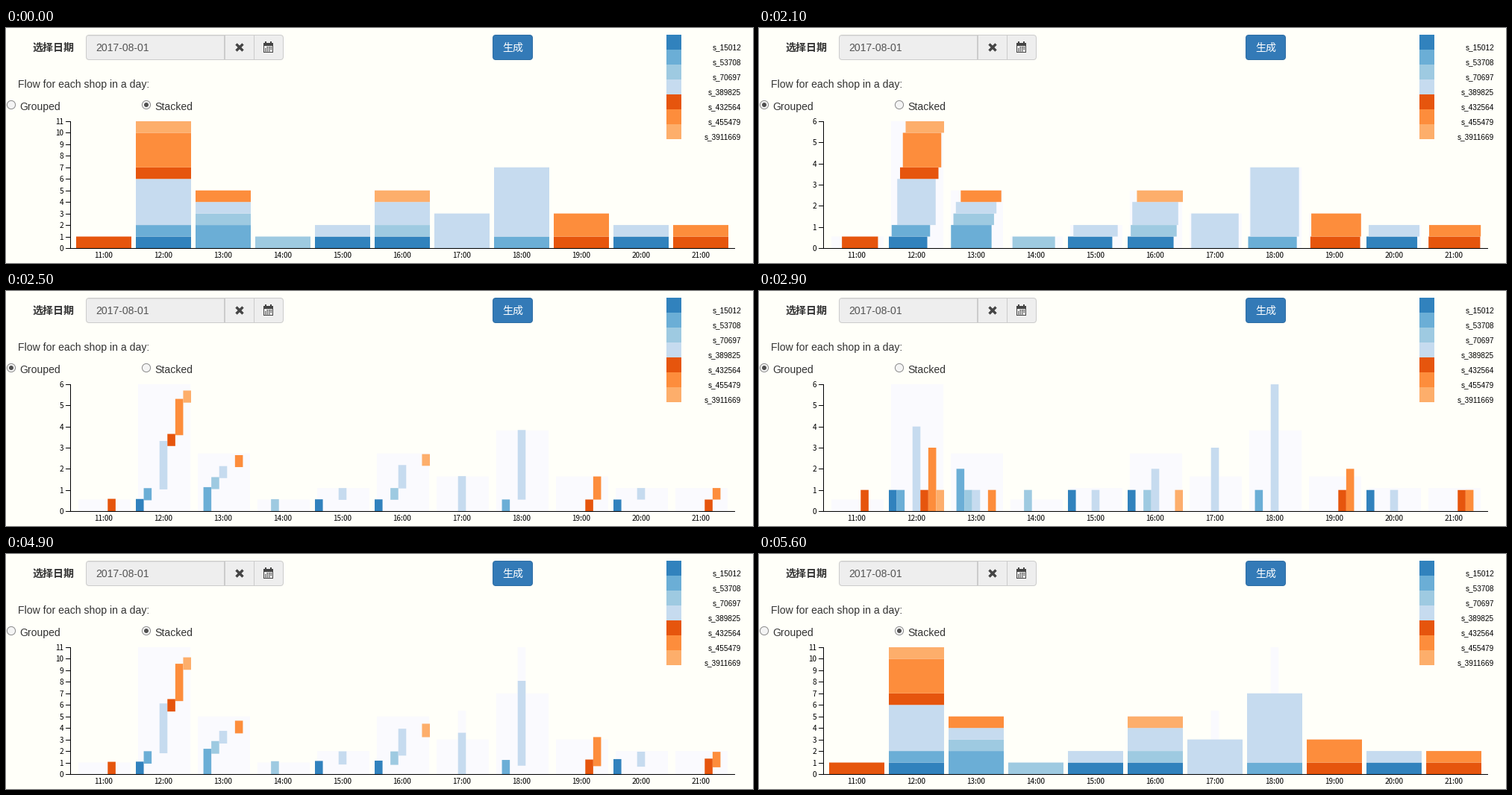
A matplotlib script for the animation above (7100 ms loop, 1001 px wide and 315 px high).

```python
import matplotlib.pyplot as plt
from matplotlib.animation import FuncAnimation
from matplotlib.patches import Circle, FancyBboxPatch, Rectangle

W, H, DPI = 1001, 315, 64
PT = 72 / DPI  # points per pixel
STEP_MS, LOOP_MS = 100, 7100

BACK = "#fffff9"
WASH = "#fafafe"
COLORS = ["#3182bd", "#6baed6", "#9ecae1", "#c6dbef",
          "#e6550d", "#fd8d3c", "#fdae6b"]
SHOPS = ["s_15012", "s_53708", "s_70697", "s_389825",
         "s_432564", "s_455479", "s_3911669"]
# one row per hour from 11:00, one digit per shop
FLOWS = ["0000100", "1104131", "0211010", "0010000", "1001000", "1012001",
         "0003000", "0106000", "0000120", "1001000", "0000110"]

LEFT, TOP, BASE = 86, 125, 295
BAND, BAR = 80, 74
STACK_MAX, GROUP_MAX = 11, 6
SANS, CJK = "Liberation Sans", "Noto Sans CJK JP"

GROUP_AT, STACK_AT = 1867, 4534      # moments of the two clicks
GROUP_SEEN, STACK_SEEN = 1900, 4600  # first pictures that show them
DURATION, DELAY = 500, 10

plt.rcParams["toolbar"] = "None"
fig = plt.figure(figsize=(W / DPI, H / DPI), dpi=DPI, facecolor=BACK)
ax = fig.add_axes([0, 0, 1, 1])
ax.set_xlim(0, W)
ax.set_ylim(H, 0)
ax.axis("off")


def box(x, y, w, h, color, z=2):
    return ax.add_patch(Rectangle((x, y), w, h, fc=color, lw=0, zorder=z,
                                  snap=False))


def rounded(x, y, w, h, fill, edge):
    ax.add_patch(FancyBboxPatch(
        (x + 0.5, y + 0.5), w - 1, h - 1, fc=fill, ec=edge, lw=PT,
        boxstyle="round,pad=0,rounding_size=4", zorder=1))


def label(x, y, text, size=14, color="#333333", font=SANS, **kw):
    return ax.text(x, y, text, fontsize=size * PT, color=color, family=font,
                   va="baseline", zorder=5, **kw)


def radio(x, y):
    ax.add_patch(Circle((x, y), 5.6, fc="#f4f4f4", ec="#8c8c8c", lw=PT,
                        zorder=3))
    return ax.add_patch(Circle((x, y), 3, fc="#505050", lw=0, zorder=4))


def draw_form():
    label(36, 31, "选择日期", font=CJK, weight="bold")
    rounded(107, 9, 265, 34, "#eeeeee", "#cccccc")
    box(109, 10, 183, 1, "#dedede")
    box(292, 10, 2, 32, "#cccccc")
    box(332, 10, 1, 32, "#cccccc")
    label(120, 31, "2017-08-01", color="#555555")

    for y0, y1 in ((21.5, 30.5), (30.5, 21.5)):
        ax.plot([308.5, 317.5], [y0, y1], color="#444444", lw=3.4 * PT,
                solid_capstyle="butt", zorder=3)

    box(345, 20, 13, 13, "#444444")
    box(346, 24, 11, 8, "#eeeeee")
    for x in (347, 354):
        box(x, 18, 2, 4, "#444444")
    for row in range(3):
        for col in range(4):
            if (row, col) not in ((0, 0), (2, 3)):
                box(347 + 2.5 * col, 25 + 2.4 * row, 1.6, 1.5, "#444444")

    rounded(652, 9, 54, 34, "#337ab7", "#2e6da4")
    label(665, 31, "生成", color="white", font=CJK)
    label(16, 80, "Flow for each shop in a day:")
    label(18, 110, "Grouped")
    label(199, 110, "Stacked")


def draw_legend():
    for i, (shop, color) in enumerate(zip(SHOPS, COLORS)):
        box(885, 9 + 20 * i, 20, 20, color)
        label(985, 29 + 20 * i, shop, 10, "black", ha="right")


def draw_axes():
    box(LEFT, TOP, 1, BASE - TOP + 1, "black", 4)
    box(LEFT, BASE, 891, 1, "black", 4)
    for i in range(len(FLOWS)):
        label(LEFT + 8 + BAND * i + BAR / 2, 308, f"{11 + i}:00", 10, "black",
              CJK, ha="center")


def y_ticks(top):
    parts = []
    for v in range(top + 1):
        y = round(BASE - v * (BASE - TOP) / top)
        parts.append(box(LEFT - 6, y, 6, 1, "black", 4))
        parts.append(label(77, y + 4, str(v), 10, "black", CJK, ha="right"))
    return parts


def ease(t):
    t = min(max(t, 0), 1)
    return 4 * t ** 3 if t < 0.5 else 1 - 4 * (1 - t) ** 3


def mix(a, b, k):
    return a + (b - a) * k


class Bar:
    """One shop in one hour, between its stacked and grouped place."""

    def __init__(self, hour, shop, value, below):
        unit = (BASE - TOP) / STACK_MAX
        x = LEFT + 8 + BAND * hour
        self.hour = hour
        self.stacked = (x, BASE - (below + value) * unit, BAR, value * unit)
        tall = value * (BASE - TOP) / GROUP_MAX
        self.grouped = (x + shop * BAR / 7, BASE - tall, BAR / 7, tall)
        self.patch = box(*self.stacked, COLORS[shop], 3)

    def place(self, kx, ky):
        x, y, w, h = (mix(a, b, k) for a, b, k in
                      zip(self.stacked, self.grouped, (kx, ky, kx, ky)))
        self.patch.set_bounds(x, y, w, h)


draw_form()
draw_legend()
draw_axes()
group_dot, stack_dot = radio(7, 103), radio(188, 103)
group_ticks, stack_ticks = y_ticks(GROUP_MAX), y_ticks(STACK_MAX)

# faint traces that the bars leave behind
bars, stack_trace, group_trace = [], [], []
for hour, row in enumerate(FLOWS):
    below = 0
    for shop, value in enumerate(map(int, row)):
        if value:
            bar = Bar(hour, shop, value, below)
            bars.append(bar)
            below += value
            if shop == 3:
                group_trace.append(box(*bar.grouped, WASH, 1))
    tall = below * (BASE - TOP) / STACK_MAX
    stack_trace.append(box(LEFT + 11 + BAND * hour, BASE - tall, BAR - 4,
                           tall, WASH, 1))


def show(parts, on):
    for part in parts:
        part.set_visible(on)


def progress(t, hour):
    """How far a bar is grouped, across and upright."""
    back = t >= STACK_SEEN
    ms = t - (STACK_AT if back else GROUP_AT) - DELAY * hour
    first, second = ease(ms / DURATION), ease(ms / DURATION - 1)
    return (1 - second, 1 - first) if back else (first, second)


def draw(n):
    t = n * STEP_MS
    grouped = GROUP_SEEN <= t < STACK_SEEN
    show([group_dot, *group_ticks], grouped)
    show([stack_dot, *stack_ticks], not grouped)
    show(stack_trace, t > GROUP_SEEN)
    show(group_trace, t > STACK_SEEN)
    for bar in bars:
        bar.place(*progress(t, bar.hour))
    return []


anim = FuncAnimation(fig, draw, frames=LOOP_MS // STEP_MS, interval=STEP_MS,
                     init_func=lambda: draw(0), repeat=True, repeat_delay=0)
plt.show()
```
